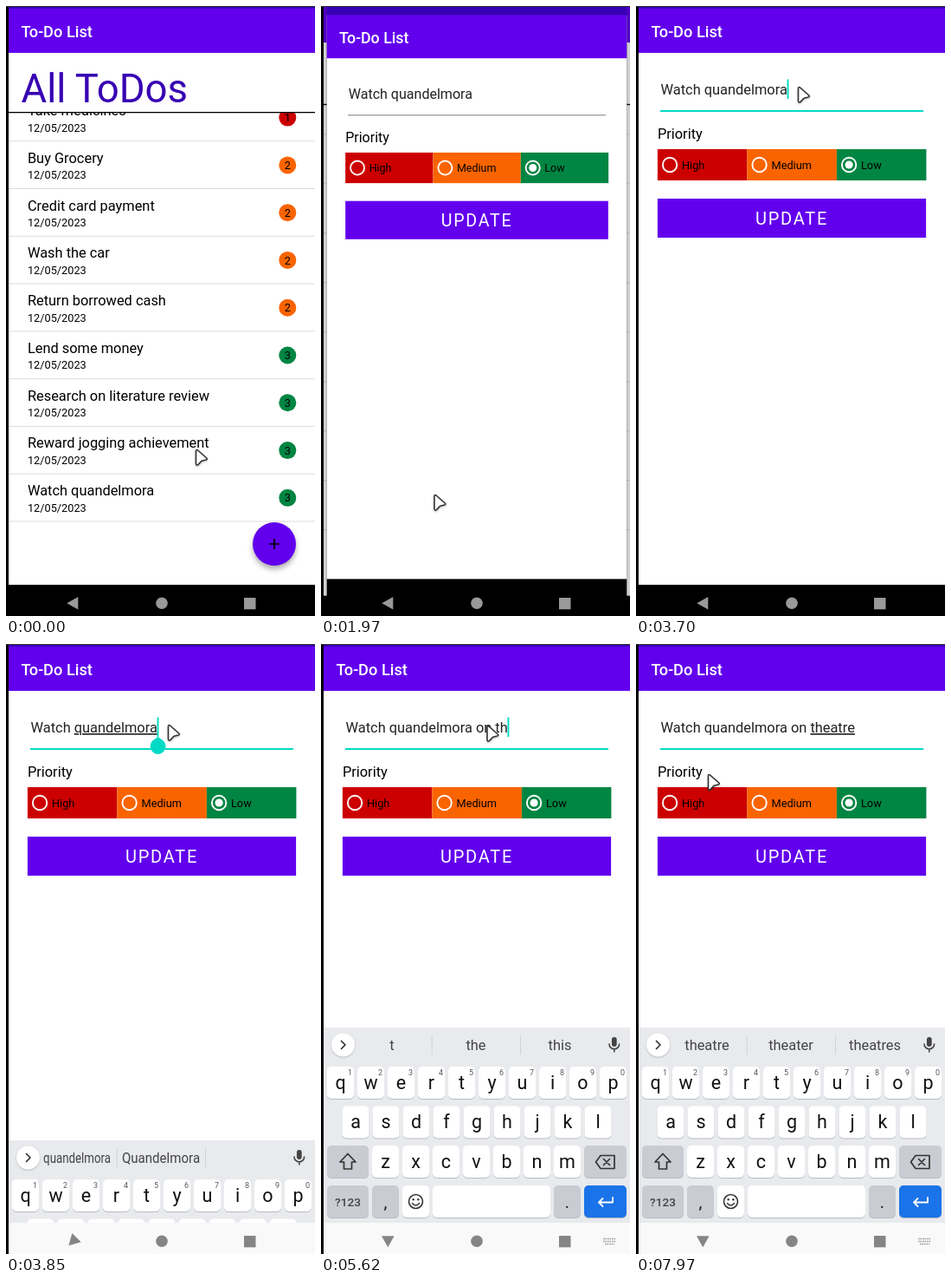
An HTML page for the animation above (8000 ms loop, 357 px wide and 703 px high).

```html
<!DOCTYPE html>
<html lang="en">
<head>
<meta charset="utf-8">
<title>To-Do List</title>
<style>
  html, body { margin: 0; width: 100%; height: 100%; overflow: hidden; background: #000; }
  svg { display: block; width: 357px; height: 703px; }
  text { font-family: Roboto, "Noto Sans", sans-serif; white-space: pre; }
  .mid { text-anchor: middle; }
  .line { fill: none; stroke-linecap: round; stroke-linejoin: round; }
  .fab { filter: drop-shadow(0 4px 3px rgba(0, 0, 0, .32)); }
  .chip { filter: drop-shadow(0 1px 1px rgba(0, 0, 0, .2)); }
  .pointer { filter: drop-shadow(0 1px 1px rgba(0, 0, 0, .3)); }
  .mark { text-decoration: underline; }
</style>
</head>
<body>
<svg id="stage" viewBox="0 0 357 703" xmlns="http://www.w3.org/2000/svg"></svg>
<script>
const LOOP = 8000;
const PURPLE = '#6200ee', DARK = '#3700b3', TEAL = '#03dac5';
const RED = '#cc0000', ORANGE = '#fa6400', GREEN = '#008542';
const FILM = 'quandelmora', FILM_CAP = 'Quandelmora';
const stage = document.getElementById('stage');

function add(parent, name, attrs = {}, text) {
  const node = document.createElementNS('http://www.w3.org/2000/svg', name);
  set(node, attrs);
  if (text !== undefined) node.textContent = text;
  parent.appendChild(node);
  return node;
}
function set(node, attrs) {
  for (const k in attrs) node.setAttribute(k, attrs[k]);
}
const group = (parent, attrs) => add(parent, 'g', attrs);
const rect = (p, x, y, w, h, fill, more) =>
  add(p, 'rect', { x, y, width: w, height: h, fill, ...more });
const disc = (p, cx, cy, r, fill, more) => add(p, 'circle', { cx, cy, r, fill, ...more });
const label = (p, x, y, size, fill, text, more) =>
  add(p, 'text', { x, y, 'font-size': size, fill, ...more }, text);
const stroke = (p, d, color, width) =>
  add(p, 'path', { d, class: 'line', stroke: color, 'stroke-width': width });
const show = (node, on) => { node.style.display = on ? '' : 'none'; };

// Page shell shared by both screens
function page() {
  const g = group(stage);
  rect(g, 3, 0, 354, 730, '#000');
  rect(g, 3, 3, 354, 664, '#fff');
  return g;
}
function appBar(g) {
  rect(g, 3, -22, 354, 26, DARK);
  rect(g, 3, 3, 354, 51, PURPLE);
  label(g, 17.6, 36, 18.2, '#fff', 'To-Do List', { 'font-weight': 500 });
}

// List screen
const list = page();
const tasks = [
  ['Take medicines', 1], ['Buy Grocery', 2], ['Credit card payment', 2],
  ['Wash the car', 2], ['Return borrowed cash', 2], ['Lend some money', 3],
  ['Research on literature review', 3], ['Reward jogging achievement', 3],
  ['Watch ' + FILM, 3]
];
tasks.forEach(([name, level], i) => {
  const y = 101 + i * 54.78;
  label(list, 24.9, y + 25, 16.4, '#000', name);
  label(list, 24.9, y + 43.5, 12.75, '#000', '12/05/2023');
  disc(list, 325.3, y + 27.6, 10, [RED, ORANGE, GREEN][level - 1]);
  label(list, 325.3, y + 32.2, 12.75, '#000', level, { class: 'mid' });
  rect(list, 3, y + 54.2, 354, 1, '#dcdcdc');
});
rect(list, 3, 54, 354, 68, '#fff');
label(list, 17.6, 111, 45.5, DARK, 'All ToDos');
rect(list, 3, 122, 354, 1.3, '#000');
appBar(list);
disc(list, 310, 620, 25, PURPLE, { class: 'fab' });
add(list, 'path', { d: 'M304 620H316M310 614V626', stroke: '#000', 'stroke-width': 1.7 });

const scrim = rect(stage, 3, 0, 354, 703, '#000', { opacity: .19 });

// Edit screen
const form = page();
appBar(form);
const field = label(form, 28.5, 102, 16.4, '#222', '');
const plain = add(field, 'tspan'), marked = add(field, 'tspan', { class: 'mark' });
const rule = rect(form, 28, 120.5, 304, 1, '#777');
const caret = rect(form, 0, 84.5, 1.9, 22.5, TEAL);
const handle = add(form, 'path', {
  d: 'M0 0L6.4 4.6A9 9 0 1 1 -6.4 4.6Z', fill: TEAL
});
label(form, 24.9, 153, 16.4, '#000', 'Priority');
[['High', RED], ['Medium', ORANGE], ['Low', GREEN]].forEach(([name, color], i) => {
  const x = 24.9 + i * 103.5;
  rect(form, x, 165, 103.5, 36, color);
  disc(form, x + 14.2, 183, 8.2, 'none', { stroke: '#fff', 'stroke-width': 1.9 });
  if (i === 2) disc(form, x + 14.2, 183, 4.6, '#fff');
  label(form, x + 28.1, 187.6, 12.75, '#000', name);
});
rect(form, 24.9, 222, 310.2, 45, PURPLE);
label(form, 137.9, 252.3, 20, '#fff', 'UPDATE', { 'letter-spacing': 1.79 });

// Keyboard
const board = group(stage);
rect(board, 3, 442, 354, 261, '#e8eaed');
disc(board, 25.5, 462, 13.5, '#fff', { class: 'chip' });
stroke(board, 'M23.5 457.5L28 462L23.5 466.5', '#333', 1.7);
rect(board, 127.7, 451, 1, 22, '#cfd2d6');
rect(board, 230, 451, 1, 22, '#cfd2d6');
rect(board, 335.9, 453, 5.8, 11, '#444', { rx: 2.9 });
stroke(board, 'M333 461A5.8 5.8 0 0 0 344.6 461M338.8 467V470', '#444', 1.6);
const words = [82, 179, 276].map(x =>
  label(group(board, { transform: `translate(${x} 468)` }), 0, 0, 16.4, '#444', '', { class: 'mid' }));

function key(x, y, w, fill = '#fff') {
  rect(board, x, y + 1, w, 37, '#b9bcc2', { rx: 5 });
  rect(board, x, y, w, 37, fill, { rx: 5 });
}
function keyRow(chars, x, y, hints) {
  [...chars].forEach((c, i) => {
    const left = x + i * 35;
    key(left, y, 31);
    label(board, left + 15.5, y + 25.5, 21.5, '#111', c, { class: 'mid' });
    if (hints) label(board, left + 26.5, y + 10, 9, '#555', (i + 1) % 10, { class: 'mid' });
  });
}
const GREY = '#c9ccd2';
keyRow('qwertyuiop', 7, 487, true);
keyRow('asdfghjkl', 24.5, 532.5);
keyRow('zxcvbnm', 59, 578);
key(7, 578, 48, GREY);
stroke(board, 'M31 587.5L40 597H35.5V605H26.5V597H22Z', '#333', 1.7);
key(304, 578, 49, GREY);
stroke(board, 'M323 589.5H339V604.5H323L317.5 597Z', '#333', 1.7);
stroke(board, 'M326.5 593.5L333.5 600.5M333.5 593.5L326.5 600.5', '#333', 1.7);
key(7, 624, 48, GREY);
label(board, 31, 647.5, 13.6, '#444', '?123', { class: 'mid', 'font-weight': 500 });
key(59, 624, 31, GREY);
label(board, 74.5, 650, 20, '#222', ',', { class: 'mid' });
key(94, 624, 31);
disc(board, 109.5, 642.5, 8, 'none', { stroke: '#333', 'stroke-width': 1.6 });
disc(board, 106.7, 640.3, 1.2, '#333');
disc(board, 112.3, 640.3, 1.2, '#333');
stroke(board, 'M105.5 644.5Q109.5 649.5 113.5 644.5', '#333', 1.5);
key(129, 624, 136);
key(269, 624, 31, GREY);
label(board, 284.5, 650, 20, '#222', '.', { class: 'mid' });
key(304, 624, 49, '#1a73e8');
stroke(board, 'M337 638V643.5H321M325.5 639L321 643.5L325.5 648', '#fff', 1.8);

// Navigation bar
const nav = group(stage);
const navBack = rect(nav, 3, 667, 354, 36, '#f9f9fa');
const back = add(nav, 'path', { d: 'M-7 0L6 -7.3V7.3Z' });
const home = disc(nav, 180, 688.3, 6.8);
const recent = rect(nav, 275, 682, 13.5, 13.3);
const keysIcon = add(nav, 'path', {
  d: 'M326 685.5H341M326 688.5H341M328 691.5H339', stroke: '#999',
  'stroke-width': 1.3, 'stroke-dasharray': '1.6 .9'
});

rect(stage, 0, 0, 3, 703, '#000');
rect(stage, 0, 0, 357, 1, '#333');

const pointer = add(stage, 'path', {
  d: 'M2 3Q2 .8 4 2L14.3 11Q15.5 12.4 13.5 13L8.5 14.2L4.4 18.6Q2.2 19.8 2 17.5Z',
  fill: '#fff', stroke: '#333', 'stroke-width': 1.6, 'stroke-linejoin': 'round', class: 'pointer'
});

// Timed steps: time first, then values
const moves = [
  [0, 217.5, 510], [500, 250, 498], [620, 306, 560], [750, 240, 625], [870, 150, 584],
  [1020, 136, 571], [1140, 131, 566], [1290, 129, 562], [2240, 129, 556],
  [2390, 123, 440], [2510, 130, 315], [2650, 134.5, 237], [2780, 134, 193],
  [2930, 136, 170], [3060, 136, 157], [3200, 150, 128], [3320, 168, 106],
  [3450, 180, 95], [3570, 185.5, 92], [4150, 190, 93], [7970, 81.5, 149]
];
const screens = [[0, 1, 0], [1970, 1.04, .979], [2120, 1.05, .995], [2240, 0, 1]];
const carets = [[0, 0], [3700, 1], [4300, 0], [4730, 1], [7820, 0]];
const slides = [[0, 261], [3850, 130], [4000, 0]];
const base = 'Watch ' + FILM;
const typing = [
  [0, base, ''],
  [3850, 'Watch ', FILM],
  [4730, base + ' ', ''],
  [4850, base + ' o', ''],
  [4970, base + ' on', ''],
  [5220, base + ' on ', ''],
  [5340, base + ' on t', ''],
  [5620, base + ' on th', ''],
  [5870, base + ' on ', 'th'],
  [6150, base + ' on ', 'the'],
  [6450, base + ' on ', 'thea'],
  [6600, base + ' on ', 'theat'],
  [7030, base + ' on ', 'theatr'],
  [7270, base + ' on ', 'theatre']
];
const hints = [
  [0, FILM, FILM_CAP, ''],
  [4730, 'and', 'in', 'of'],
  [4970, 'o', 'of', 'to'],
  [5220, 'on', 'of', 'one'],
  [5620, 't', 'the', 'this'],
  [5870, 'th', 'the', 'this'],
  [6450, 'the', 'they', 'their'],
  [6720, 'thea', 'the', 'their'],
  [7150, 'theat', 'theatre', 'theatres'],
  [7270, 'theatr', 'theatre', 'theatres'],
  [7420, 'theatre', 'theater', 'theatres']
];
function at(steps, t) {
  let i = steps.length - 1;
  while (i && steps[i][0] > t) i--;
  return steps[i].slice(1);
}
const zoom = s => `translate(180 351) scale(${s}) translate(-180 -351)`;

function draw(t) {
  const [listZoom, formZoom] = at(screens, t);
  show(list, listZoom);
  show(form, formZoom);
  show(scrim, listZoom && formZoom);
  if (listZoom) set(list, { transform: zoom(listZoom) });
  if (formZoom) set(form, { transform: zoom(formZoom) });

  const [head, tail] = at(typing, t);
  plain.textContent = head;
  marked.textContent = tail;
  if (formZoom) {
    const end = 28.5 + field.getComputedTextLength();
    set(caret, { x: end - .3 });
    set(handle, { transform: `translate(${end + .7} 107)` });
  }
  show(caret, at(carets, t)[0]);
  show(handle, t >= 3850 && t < 4730);
  const focus = t >= 3700;
  set(rule, { y: focus ? 120 : 120.5, height: focus ? 2 : 1, fill: focus ? TEAL : '#777' });

  const open = t >= 3850, settled = t >= 4000;
  show(board, open);
  set(board, { transform: `translate(0 ${at(slides, t)[0]})` });
  at(hints, t).forEach((word, i) => {
    words[i].textContent = word;
    // long words are condensed by the suggestion strip
    set(words[i], { transform: `scale(${word.length > 9 ? [.81, .92, .92][i] : 1} 1)` });
  });
  show(navBack, open);
  show(keysIcon, settled);
  [back, home, recent].forEach(n => set(n, { fill: open ? '#858585' : '#999' }));
  set(back, { transform: `translate(77.3 688.3) rotate(${settled ? -90 : open ? -45 : 0})` });

  const [x, y] = at(moves, t);
  set(pointer, { transform: `translate(${x} ${y})` });
}

const start = performance.now();
function tick() {
  draw((performance.now() - start) % LOOP);
  requestAnimationFrame(tick);
}
tick();
</script>
</body>
</html>
```
